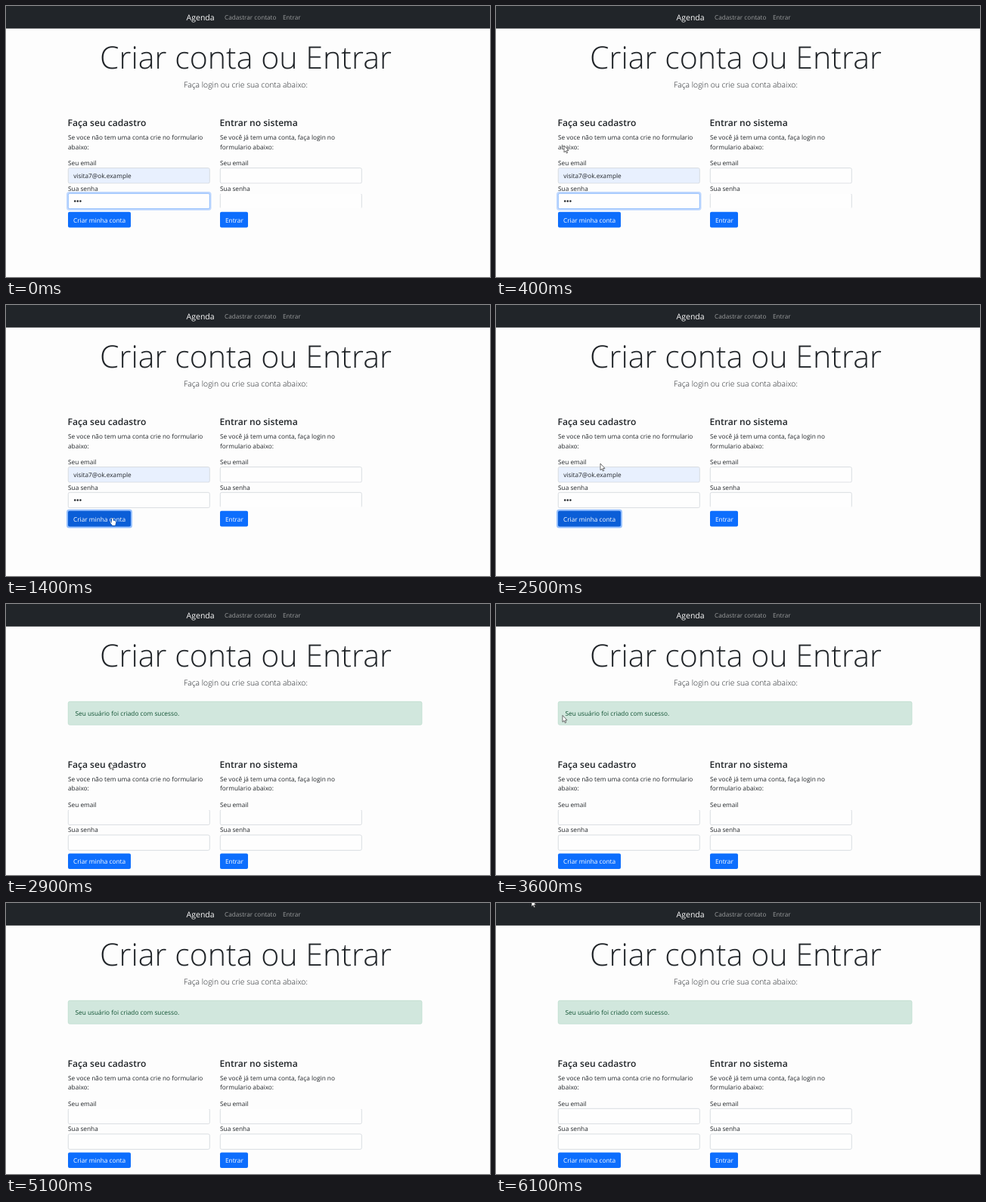
An HTML page with a canvas for the animation above (6.2 s loop, 640x359 px).

```html
<!DOCTYPE html>
<html lang="pt-BR">
<head>
<meta charset="utf-8">
<title>Agenda</title>
<style>
  html, body { margin: 0; width: 100%; height: 100%; overflow: hidden; background: #fdfdfd; }
  canvas { display: block; }
</style>
</head>
<body>
<canvas id="stage" width="640" height="359"></canvas>
<script>
const ctx = document.getElementById('stage').getContext('2d');
const LOOP = 6200, STEP = 100;
const SUBMITTED = 2900, ALERT_SHIFT = 57.7;
const INK = '#212529', BLUE = '#0d6efd', BORDER = '#d5dade';
const FIELD_W = 187, FIELD_H = 20.3;
const FAMILY = '"Open Sans", "Noto Sans", sans-serif';

// Cursor runs: shape, end time and [time, x, y] stops.
const RUNS = [
  { shape: 'arrow', end: 600, stops: [[100, 20, 30], [300, 58, 120], [500, 122, 250], [600, 137, 274]] },
  { shape: 'hand', end: 1500, stops: [[600, 138, 276], [700, 140, 281], [800, 140, 282], [1200, 138.5, 282], [1500, 138.5, 282]] },
  { shape: 'arrow', end: 3100, stops: [[1500, 139, 258], [1700, 138.5, 206], [1900, 139, 205], [2000, 138, 207], [2400, 138.5, 208], [2500, 138, 210], [3100, 137.5, 210]] },
  { shape: 'arrow', end: 3700, stops: [[3300, 80, 162], [3500, 84, 152], [3700, 92, 143]] },
  { shape: 'beam', end: 4500, stops: [[3700, 95, 143.5], [3900, 103, 143.5], [4000, 123, 143.5], [4200, 200, 143.5], [4300, 200, 143.5], [4400, 231, 145.5], [4500, 231, 145.5]] },
  { shape: 'arrow', end: 5100, stops: [[4500, 248, 162], [4700, 290, 218], [5000, 332, 270], [5100, 332, 270]] },
  { shape: 'arrow', end: 6200, stops: [[5400, 180, 139], [5600, 95, 92], [5800, 25, 42], [6000, 45, -2], [6100, 47, -4], [6200, 47, -4]] }
];

const mix = (a, b, k) => a + (b - a) * k;

function text(str, x, y, size = 8.29, weight = 400, color = INK) {
  ctx.font = `${weight} ${size}px ${FAMILY}`;
  ctx.fillStyle = color;
  ctx.fillText(str, x, y);
}

function box(x, y, w, h, fill, stroke, radius = 2) {
  ctx.beginPath();
  ctx.roundRect(x, y, w, h, radius);
  if (fill) { ctx.fillStyle = fill; ctx.fill(); }
  if (stroke) { ctx.strokeStyle = stroke; ctx.lineWidth = 0.9; ctx.stroke(); }
}

function ring(x, y, w, h, color) {
  box(x - 2, y - 2, w + 4, h + 4, color, null, 3.5);
}

// cutTop and cutBottom hide the faint horizontal edges of a field.
function field(x, y, { fill = '#fefefe', stroke = BORDER, cutTop = 0, cutBottom = 0 } = {}) {
  ctx.save();
  ctx.beginPath();
  ctx.rect(x - 1, y - 1 + cutTop, FIELD_W + 2, FIELD_H + 2 - cutTop - cutBottom);
  ctx.clip();
  box(x + 0.3, y + 0.3, FIELD_W, FIELD_H, fill, stroke);
  ctx.restore();
}

function button(label, x, y, w, color) {
  box(x, y, w, 20.6, color);
  text(label, x + 7, y + 13.9, 8.29, 400, '#fff');
}

function header() {
  ctx.fillStyle = '#fdfdfd';
  ctx.fillRect(0, 0, 640, 359);
  ctx.fillStyle = INK;
  ctx.fillRect(0, 0, 640, 29.8);
  text('Agenda', 238.6, 18.8, 10.5, 400, '#fff');
  text('Cadastrar contato', 289, 18.2, 8.2, 400, '#9b9d9e');
  text('Entrar', 366, 18.2, 8.2, 400, '#9b9d9e');
  text('Criar conta ou Entrar', 124, 82.5, 41.1, 300);
  text('Faça login ou crie sua conta abaixo:', 235, 107.6, 10.35, 300);
}

function column(x, title, line) {
  text(title, x - 0.5, 159.3, 12.1, 600);
  text(line, x, 176.8);
  text('formulario abaixo:'.slice(x < 200 ? 11 : 0), x, 189.7);
  text('Seu email', x, 211);
  text('Sua senha', x, 244.7);
}

function forms(t) {
  const done = t >= SUBMITTED;
  column(82, 'Faça seu cadastro', 'Se voce não tem uma conta crie no formulario');
  column(283, 'Entrar no sistema', 'Se você já tem uma conta, faça login no');

  const faintTop = { cutTop: done && t < 5200 ? 2 : 0 };
  field(283, 214.3, faintTop);
  field(283, 248, done ? {} : { cutTop: t < 700 ? 2 : 0, cutBottom: 2 });

  const pressed = !done && t >= 1400;
  const hover = t >= 700 && t < 1400;
  if (done) {
    field(82, 214.3, faintTop);
    field(82, 248);
  } else {
    const focus = Math.max(0, Math.min(1, (700 - t) / 150));
    field(82, 214.3, { fill: '#e8f0fe' });
    text('visita7@ok.example', 89.2, 228);
    if (focus) ring(82, 248, FIELD_W + 0.5, FIELD_H + 0.5, `rgba(13,110,253,${0.25 * focus})`);
    field(82, 248, { stroke: focus ? '#86b7fe' : BORDER });
    ctx.fillStyle = INK;
    for (let i = 0; i < 3; i++) {
      ctx.beginPath();
      ctx.arc(91.2 + i * 3.6, 258.4, 1.25, 0, Math.PI * 2);
      ctx.fill();
    }
  }

  if (pressed) ring(82, 272.8, 83, 20.6, 'rgba(49,132,253,.5)');
  button('Criar minha conta', 82, 272.8, 83, pressed ? '#0b5ed7' : hover ? '#0c64e8' : BLUE);
  button('Entrar', 283, 272.8, 37, hover ? '#0c67ec' : BLUE);
}

function polygon(points) {
  ctx.beginPath();
  points.forEach(([x, y]) => ctx.lineTo(x, y));
  ctx.closePath();
}

const cursors = {
  arrow() {
    polygon([[0, 0], [0, 8.8], [2, 7], [3.3, 10], [4.7, 9.4], [3.4, 6.5], [6, 6.4]]);
    ctx.fillStyle = '#fff';
    ctx.strokeStyle = '#333';
    ctx.lineWidth = 0.7;
    ctx.fill();
    ctx.stroke();
  },
  hand() {
    ctx.beginPath();
    ctx.moveTo(1.5, 6.5);
    ctx.lineTo(1.5, 0.8);
    ctx.quadraticCurveTo(2.3, -0.4, 3.1, 0.8);
    ctx.lineTo(3.1, 3.6);
    ctx.lineTo(6, 4.2);
    ctx.quadraticCurveTo(7, 4.5, 6.8, 6);
    ctx.lineTo(5.8, 10);
    ctx.lineTo(2.3, 10);
    ctx.lineTo(-0.8, 6);
    ctx.quadraticCurveTo(-0.2, 4.6, 1.5, 6.5);
    ctx.closePath();
    ctx.fillStyle = '#fff';
    ctx.strokeStyle = '#28364c';
    ctx.lineWidth = 0.6;
    ctx.stroke();
    ctx.fill();
  },
  beam() {
    ctx.fillStyle = '#e9f3ee';
    ctx.fillRect(-1, -5.5, 2, 11);
    ctx.fillStyle = '#9fb5aa';
    ctx.fillRect(-0.3, -5, 0.6, 10);
  }
};

function cursor(t) {
  const run = RUNS.find(r => t >= r.stops[0][0] && t < r.end);
  if (!run) return;
  const i = run.stops.findIndex(s => s[0] > t);
  const [t0, x0, y0] = run.stops[i - 1], [t1, x1, y1] = run.stops[i];
  const k = (t - t0) / (t1 - t0);
  ctx.save();
  ctx.translate(mix(x0, x1, k), mix(y0, y1, k));
  cursors[run.shape]();
  ctx.restore();
}

function draw(t) {
  header();
  ctx.save();
  if (t >= SUBMITTED) {
    box(82.3, 129.3, 467.6, 30.8, '#d1e7dd', '#c0ded0');
    text('Seu usuário foi criado com sucesso.', 91.5, 147.6, 8.29, 400, '#0f5132');
    ctx.translate(0, ALERT_SHIFT);
  }
  forms(t);
  ctx.restore();
  cursor(t);
}

const start = performance.now();
function tick() {
  const t = (performance.now() - start) % LOOP;
  draw(Math.floor(t / STEP) * STEP);
  requestAnimationFrame(tick);
}
ctx.textRendering = 'geometricPrecision';
tick();
</script>
</body>
</html>
```
